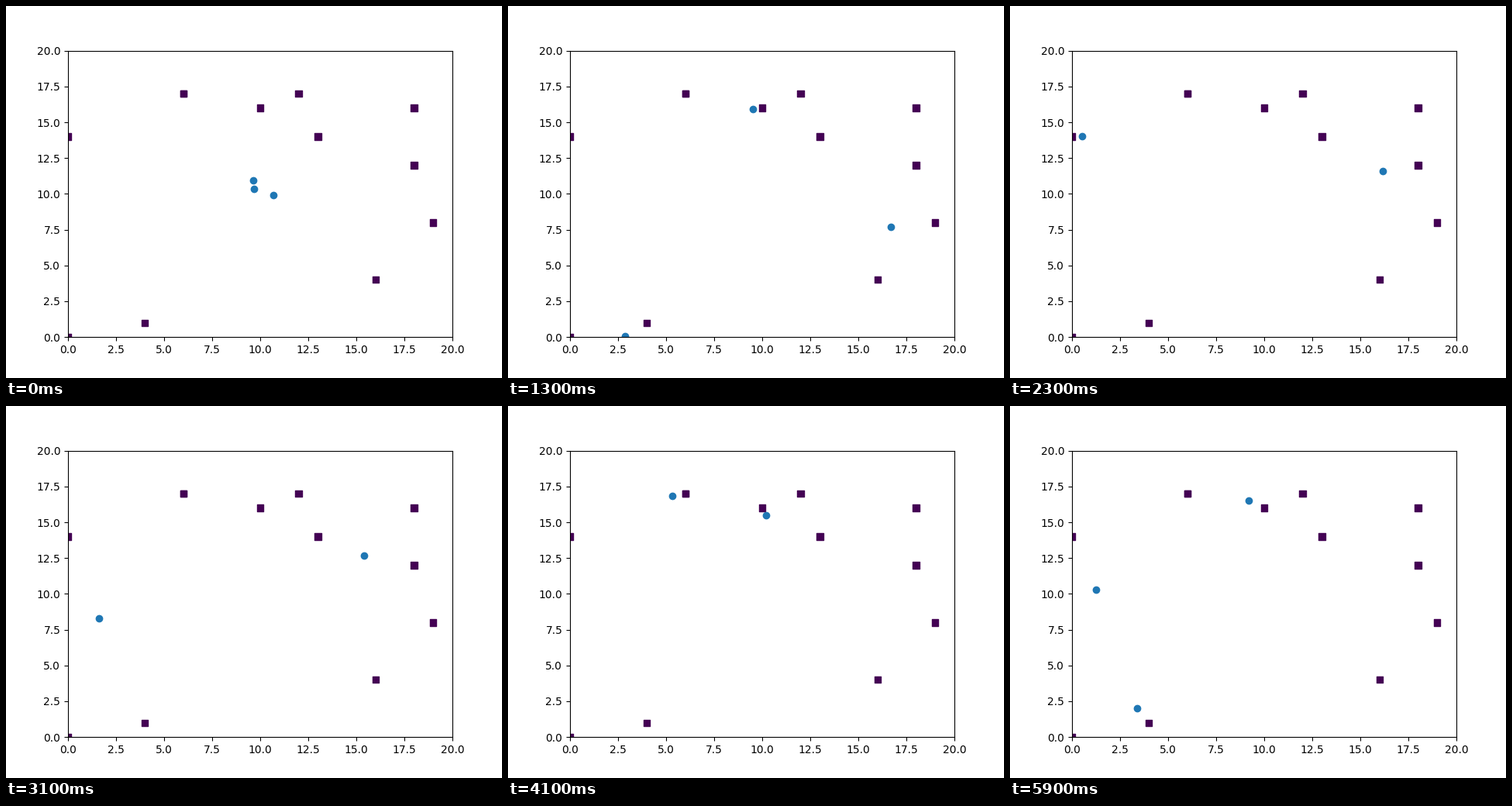
Write a matplotlib script that moves like this. It is 640x480 px and loops after 6000 ms.

```python
import math
import numpy as np
import matplotlib.pyplot as plt
from matplotlib.animation import FuncAnimation

FRAMES = 60
INTERVAL = 100  # ms
PACE = 0.95     # distance walked per step

FOOD = [(0, 0), (0, 14), (4, 1), (6, 17), (6, 17), (10, 16), (12, 17),
        (13, 14), (18, 16), (18, 12), (19, 8), (16, 4)]

# Each route lists its turning points; a third value is a rest in steps.
ROUTES = [
    [(9.64, 10.92, 4), (9.45, 16.84), (9.53, 15.92, 2), (0.54, 14),
     (-0.3, 12.9, 2), (1.62, 8.28), (5.34, 16.83), (-0.8, 13.7),
     (-0.75, 10.28, 5), (1.26, 10.28)],
    [(9.68, 10.32), (2.87, 0.05), (2.5, -0.1), (-0.44, 0.61, 38), (3.4, 2)],
    [(10.69, 9.91), (9.82, 5.2), (19.27, 8.64, 3), (16.18, 11.58),
     (18.2, 12, 3), (12.6, 13.36, 4), (10.2, 15.48, 4), (9.6, 17.2),
     (12.18, 16.5, 3), (10.2, 16.5, 3), (9.2, 16.5)],
]


def walk(route):
    """Position at every step when walking the route at a steady pace."""
    here = np.array(route[0][:2])
    track = [here]
    for x, y, *rest in route:
        goal = np.array([x, y])
        dist = math.dist(here, goal)
        steps = max(1, round(dist / PACE)) if dist else 0
        track += [here + (goal - here) * k / steps for k in range(1, steps + 1)]
        track += [goal] * sum(rest)
        here = goal
    return track


tracks = [walk(route) for route in ROUTES]


def positions(step):
    return [track[min(step, len(track) - 1)] for track in tracks]


fig, ax = plt.subplots(figsize=(6.4, 4.8), dpi=100)
ax.set_xlim(0, 20)
ax.set_ylim(0, 20)
ax.scatter(*zip(*FOOD), c=np.zeros(len(FOOD)), marker="s")
walkers = ax.scatter(*zip(*positions(0)), color="#1f77b4")


def update(step):
    walkers.set_offsets(positions(step))
    return walkers,


anim = FuncAnimation(fig, update, frames=FRAMES, interval=INTERVAL, repeat=True)
plt.show()
```
